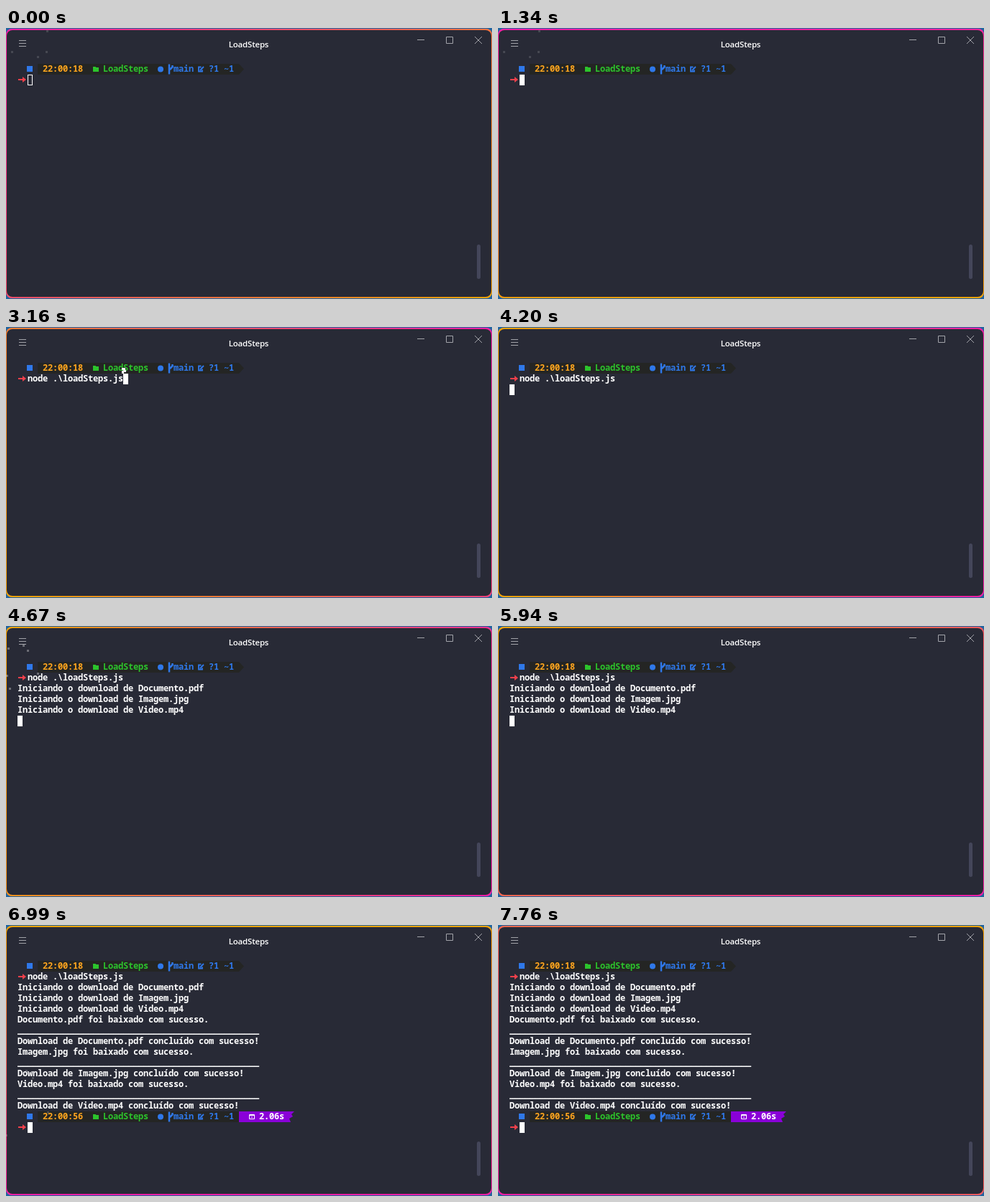
Recreate the animation shown at these times as an HTML page with a canvas. Size 676x378 px, loop 7830 ms.

```html
<!DOCTYPE html>
<html lang="pt">
<head>
<meta charset="utf-8">
<title>Terminal</title>
<style>
@property --angle { syntax: "<angle>"; inherits: false; initial-value: 135deg; }
html, body { margin: 0; width: 676px; height: 378px; overflow: hidden; background: #22649f; }
.window {
  position: absolute; inset: 1px 0; border-radius: 8px;
  background: linear-gradient(var(--angle), #fc1da7, #fba506);
  animation: turn 7830ms linear infinite;
}
.window::after {
  content: ""; position: absolute; inset: 2px 1px 2px 1px;
  border-radius: 8px; background: #282a36;
}
@keyframes turn {
  from { --angle: 135deg; }
  70.5%, 75.85% { --angle: 312.7deg; }
  75.86% { --angle: 326deg; }
  76.76%, 79.43% { --angle: 328.4deg; }
  79.44% { --angle: 335deg; }
  to { --angle: 387deg; }
}
svg, canvas { position: absolute; left: 0; top: 0; }
text {
  white-space: pre; fill: #fff; letter-spacing: -.2px;
  font: 600 12px "Noto Sans Mono", "DejaVu Sans Mono", monospace;
}
.title { font: 600 11.5px "Open Sans", "Noto Sans", sans-serif; text-anchor: middle; }
.chrome { fill: none; stroke: #a3a4aa; }
.time { fill: #ffa51e; }
.path { fill: #2cc42c; }
.git { fill: #2f78ea; }
.git-line { fill: none; stroke: #2f78ea; }
</style>
</head>
<body>
<div class="window"></div>
<svg width="676" height="378" viewBox="0 0 676 378">
  <defs>
    <g id="prompt">
      <path d="M44 50H324L331 57.5 324 65H44Z" fill="#242524"/>
      <rect class="git" x="29" y="53" width="8" height="8"/>
      <path class="path" d="M121 54h3.5l1 1H129v6h-8z"/>
      <circle class="git" cx="215" cy="57.5" r="4"/>
      <path class="git-line" d="M227 50.5V64.5M231.5 52V54.5L228 58" stroke-width="2.5"/>
      <path class="git-line" d="M271.5 54.5H268V60.5H273V58.5M270 59L275 54" stroke-width="1.8"/>
      <text class="path" x="135" y="61">LoadSteps</text>
      <text class="git" x="233" y="61">main</text>
      <text class="git" x="282" y="61">?1 ~1</text>
    </g>
    <path id="arrow" d="M17 71H23V68L28 72 23 76V73H17Z" fill="#f2404b"/>
  </defs>

  <text class="title" x="337.5" y="27">LoadSteps</text>
  <path class="chrome" d="M18 17.5H28M18 21.5H28M18 25.5H28M572 16.5H582M612.5 12.5H621.5V21.5H612.5ZM652 12L662 22M662 12L652 22"/>
  <rect x="655" y="302" width="5" height="48" rx="2.5" fill="#44465a"/>

  <use href="#prompt"/>
  <text class="time" x="51" y="61">22:00:18</text>
  <use href="#arrow"/>
  <text x="30" y="76" data-from="3120">node .\loadSteps.js</text>
  <g id="started" data-from="4260"></g>
  <g id="finished" data-from="6220"></g>
  <g data-from="6360">
    <use href="#prompt" y="210"/>
    <text class="time" x="51" y="271">22:00:56</text>
    <path d="M324 260H401L397 264 399 267 394 270 396 275H324Z" fill="#8a00d8"/>
    <path d="M338.5 264.5H345.5V270.5H338.5ZM338 265.5H346M341 268H343" fill="none" stroke="#fff"/>
    <text x="352" y="271">2.06s</text>
    <use href="#arrow" y="210"/>
  </g>
  <rect id="cursor" width="6" height="14" stroke="#fff"/>
</svg>
<canvas width="676" height="378"></canvas>
<script>
const LOOP = 7830;
const SVG = "http://www.w3.org/2000/svg";
const byId = id => document.getElementById(id);

function addLines(group, firstRow, lines) {
  lines.forEach((line, i) => {
    const text = document.createElementNS(SVG, "text");
    text.setAttribute("x", 16);
    text.setAttribute("y", 61 + 15 * (firstRow + i));
    text.textContent = line;
    group.append(text);
  });
}

const files = ["Documento.pdf", "Imagem.jpg", "Video.mp4"];
addLines(byId("started"), 2, files.map(f => `Iniciando o download de ${f}`));
addLines(byId("finished"), 5, files.flatMap(f => [
  `${f} foi baixado com sucesso.`,
  "_".repeat(48),
  `Download de ${f} concluído com sucesso!`
]));

// Cursor stops: start time, left, top
const stops = [
  [0, 30, 65], [3120, 163, 65], [4190, 16, 80],
  [4260, 16, 125], [6220, 16, 260], [6360, 30, 275]
];

// Sparks thrown up when the cursor jumps; speeds are px per 60 Hz tick
const bursts = [[3120, 163, 65], [4200, 16, 80], [6290, 16, 260]];
const speeds = [[-.46, -2.8], [.5, -2.69], [.29, -2.94], [-.54, -1.44], [-.39, -.8], [1, -1.55]];
const GRAVITY = .075;
const dust = [[8, 33], [56, 33], [44, 40], [57, 4]];

const stepped = [...document.querySelectorAll("[data-from]")];
const cursor = byId("cursor");
const ctx = document.querySelector("canvas").getContext("2d");

function dot(x, y, alpha) {
  ctx.fillStyle = `rgba(255,255,255,${alpha})`;
  ctx.fillRect(Math.round(x) - 1, Math.round(y) - 1, 3, 3);
}

function drawSparks(t) {
  ctx.clearRect(0, 0, 676, 378);
  if (t < 3120) dust.forEach(([x, y]) => dot(x, y, .14));
  for (const [start, x, y] of bursts) {
    const n = (t - start) * .06;
    const alpha = .96 ** n;
    if (n <= 0 || alpha < .1) continue;
    for (const [vx, vy] of speeds) dot(x + vx * n, y + vy * n + GRAVITY * n * n / 2, alpha);
  }
}

function draw(t) {
  for (const el of stepped) el.style.visibility = t >= el.dataset.from ? "visible" : "hidden";
  const [, x, y] = stops.findLast(([start]) => t >= start);
  cursor.setAttribute("x", x + .5);
  cursor.setAttribute("y", y + .5);
  cursor.setAttribute("fill", t < 880 ? "none" : "#fff");
  drawSparks(t);
}

let origin;
function tick(now) {
  origin ??= now;
  draw((now - origin) % LOOP);
  requestAnimationFrame(tick);
}
draw(0);
requestAnimationFrame(tick);
</script>
</body>
</html>
```
